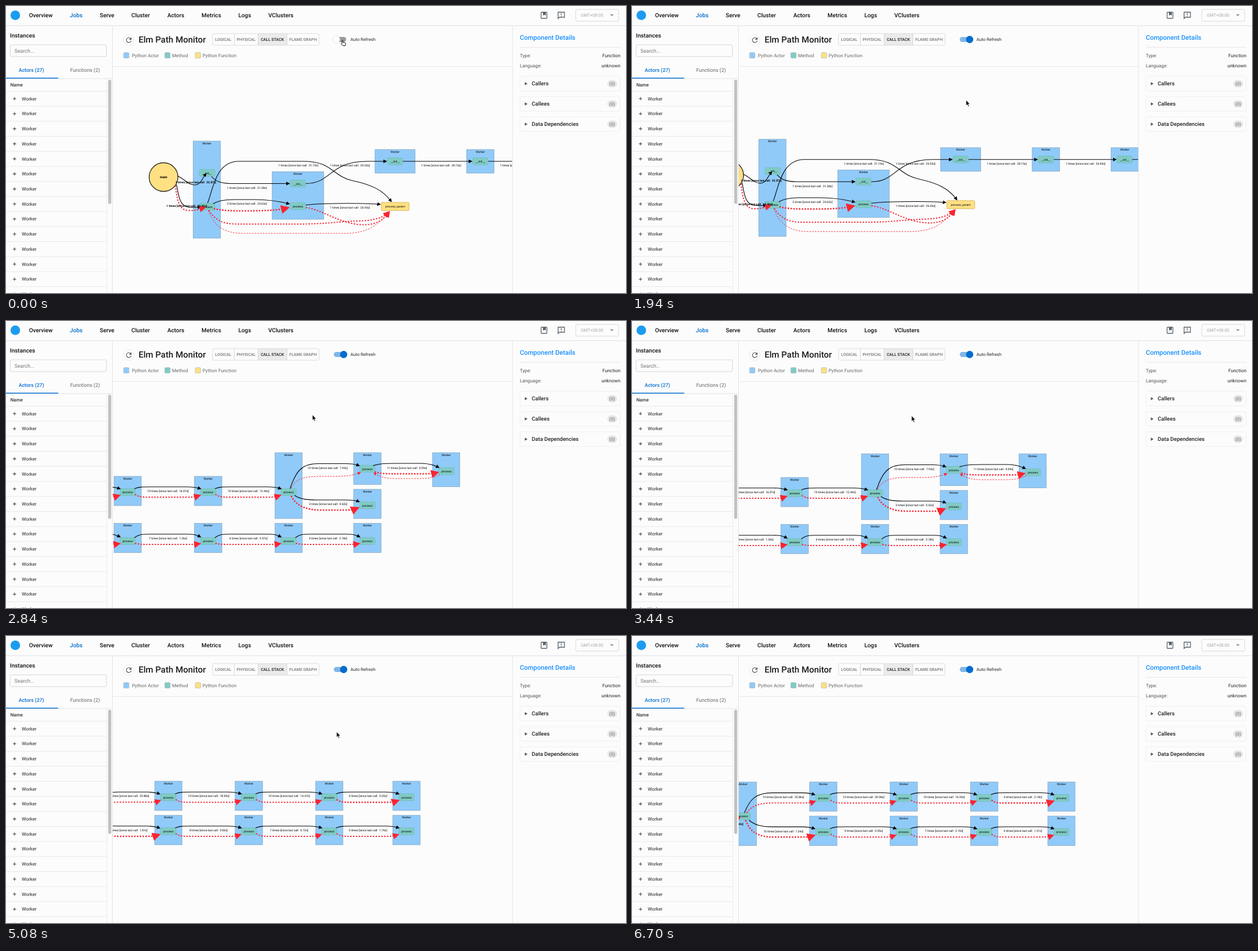
Animation of 1098 by 510 pixels, one loop 8 s. Source, as an HTML page:

```html
<!DOCTYPE html>
<html lang="en">
<head>
<meta charset="utf-8">
<title>Call stack view</title>
<style>
  html, body { margin: 0; width: 100%; height: 100%; overflow: hidden; background: #fcfcfc; }
  svg { display: block; width: 1098px; height: 510px; font-family: Roboto, sans-serif; }
  text { text-rendering: geometricPrecision; white-space: pre; }
</style>
</head>
<body>
<svg id="stage" viewBox="0 0 1098 510"></svg>
<script>
const BLUE = '#036dcf', RED = '#fb2430';
const ACTOR = '#90caf9', METHOD = '#80cbc4', FUNC = '#ffe082';
const LOOP = 8000, START = 440, TICK = 148.8;

// ---- drawing helpers ----
const text = (x, y, s, size, fill = '#222', weight = 400, anchor = 'start') =>
  `<text x="${x}" y="${y + size * 0.355}" font-size="${size}" fill="${fill}" font-weight="${weight}" text-anchor="${anchor}">${s}</text>`;
const rect = (x, y, w, h, fill, stroke = 'none', r = 0, sw = 0.7) =>
  `<rect x="${x}" y="${y}" width="${w}" height="${h}" rx="${r}" fill="${fill}" stroke="${stroke}" stroke-width="${sw}"/>`;
const path = (d, fill, stroke = 'none', sw = 1, extra = '') =>
  `<path d="${d}" fill="${fill}" stroke="${stroke}" stroke-width="${sw}" ${extra}/>`;
const circle = (x, y, r, fill, extra = '') => `<circle cx="${x}" cy="${y}" r="${r}" fill="${fill}" ${extra}/>`;
const line = (x1, y1, x2, y2, stroke = '#e2e2e2', sw = 0.8) => path(`M${x1} ${y1}L${x2} ${y2}`, 'none', stroke, sw);

// ---- graph helpers ----
const caption = (x, y, s, size = 5.12, weight = 400) => text(x, y, s, size, '#000', weight, 'middle');
const label = (x, y, n, sec, weight) => caption(x, y, `${n} times [since last call: \u00a0${sec}s]`, 5.08, weight);
const worker = (x, top, bottom, w = 48.5) =>
  rect(x - w / 2, top, w, bottom - top, ACTOR, '#7f9fb8') + caption(x, top + 3.7, 'Worker');
const node = (x, y, name = 'process') =>
  `<rect x="${x - 13.5}" y="${y - 6.3}" width="27" height="12.6" rx="2" fill="${METHOD}" stroke="#5fae9f" stroke-width=".7" stroke-dasharray="2 1.5"/>` + caption(x, y + 0.2, name);
const call = d => path(d, 'none', '#000', 1.1, 'marker-end="url(#black)"');
const flow = (d, w = 2) =>
  path(d, 'none', RED, w, `stroke-dasharray="${w < 1.3 ? '2.8 2' : '2.5 2.5'}" marker-end="url(#red)"`);

// Call and data edge between two nodes of one row; s shifts the route.
function link(x0, x1, y, n, sec, w = 2, s = 0) {
  const up = y - 9.3 + s, down = y + 9 + s;
  return call(`M${x0 + 12} ${y - 6}C${x0 + 20} ${up} ${x0 + 26} ${up} ${x0 + 40} ${up}H${x1 - 38}C${x1 - 26} ${up} ${x1 - 21} ${up + 1} ${x1 - 14} ${y - 6 + s / 2}`)
    + flow(`M${x0 + 13} ${y + 4}C${x0 + 20} ${down} ${x0 + 26} ${down} ${x0 + 40} ${down}H${x1 - 38}C${x1 - 28} ${down} ${x1 - 24} ${down} ${x1 - 16} ${y + 6.3 + s / 2}`, w)
    + label((x0 + x1) / 2, y - 2 + s, n, sec);
}

function startGraph() {
  const init = '__init__';
  return worker(355.7, 240, 412.5) + worker(517, 294.5, 379, 91.5) + worker(689, 255, 297, 71)
    + worker(840, 255, 297) + worker(979.5, 255, 297)
    + circle(279, 304, 25.5, FUNC, 'stroke="#222" stroke-width="1.3"') + caption(279, 304, 'main', 5.9, 700)
    + node(356, 296.5, init) + node(356.5, 356.5) + node(517, 315.5, init) + node(517, 355.5)
    + [689, 840, 979.5].map(x => node(x, 276, init)).join('')
    + rect(664.5, 349, 49.5, 14.5, FUNC, '#c9a545', 2) + caption(689.3, 356.4, 'process_param')
    + call('M304 302C318 309 324 319 336 318C345 317 348 305 354 298.5')
    + call('M302 317C306 340 308 356 324 357.5C332 358.3 338 358 344 357.5')
    + call('M364 303C373 313 382 315 397 315.5H501')
    + call('M357 350C366 330 370 276 412 276H527C577 276 577 301 612 310C650 318 668 328 682 347')
    + call('M367 351C376 346 386 344 402 344H440C465 344 484 347 501 351.5')
    + call('M531 315.5C577 315.5 572 276 640 276H673')
    + call('M531 353.5C555 351 580 350.7 604 350.7C630 350.7 648 351 662 352.3')
    + call('M703 276H824') + call('M854 276H963.5') + call('M993 276H1120')
    + flow('M300 319C303 344 306 362 322 363.5C334 364 342 361 351 358.5', 2)
    + flow('M359 363C371 381 384 387.5 410 387.5H517C570 387.5 585 383 625 382C652 381 666 377 677 367', 1.9)
    + flow('M531 358C562 363 585 383 622 388C650 391 666 384 678 367', 1.9)
    + flow('M358 363C368 390 385 404 420 404H600C642 404 660 388 677 366', 0.9)
    + flow('M368 360C384 364 402 364 425 364C460 364 482 363 498 359', 2.6)
    + label(336, 313.5, 1, '32.87', 700) + label(320, 355.5, 1, '32.92', 700)
    + label(426.5, 323, 1, '31.38') + label(426.5, 351, 2, '24.63') + label(517.5, 283, 1, '31.19')
    + label(609, 283.5, 1, '29.53') + label(609, 358.5, 1, '26.43')
    + label(770.5, 283.5, 1, '28.15') + label(910, 283.5, 1, '26.90');
}

function branchGraph() {
  const row = [215.5, 358, 500.5, 640];
  return row.map(x => worker(x, 359.5, 411.5)).join('')
    + worker(row[0], 276, 328) + worker(row[1], 276, 328) + worker(row[2], 234, 351)
    + worker(row[3], 234, 290.5) + worker(row[3], 299, 351) + worker(779.5, 234, 294.5)
    + row.map(x => node(x, 391)).join('') + row.slice(0, 3).map(x => node(x, 304)).join('')
    + node(640, 262.5) + node(640, 327.5) + node(780, 267)
    + link(73, row[0], 304, 10, '19.70', 2.2) + link(row[0], row[1], 304, 10, '16.07', 2.1)
    + link(row[1], row[2], 304, 10, '12.44', 2.1)
    + link(73, row[0], 391, 8, '0.05', 2.2, -3) + link(row[0], row[1], 391, 7, '1.26', 2.1, -3)
    + link(row[1], row[2], 391, 6, '0.57', 2.1, -3) + link(row[2], row[3], 391, 4, '2.18', 2.1, -3)
    + call('M503 298C513 268 523 253.5 552 253.5H602C613 253.5 619 254.5 625 257')
    + flow('M505 297C514 280 528 276 560 276H588C606 276 618 273 627 269.5', 1)
    + call('M650 257C664 253 672 253 690 253H735C750 253 758 256 766 260')
    + flow('M653 268C663 271.5 672 271.5 700 271.5H738C752 271.5 757 271 763 269.5', 2.4)
    + flow('M768 273C756 279 745 280 730 280H690C672 280 662 277 652 270.5', 0.9)
    + call('M511 310C522 317 534 318 550 318H600C612 318 619 318.5 625 321')
    + flow('M505 311C514 328 530 336 558 336H598C609 336 615 335.5 622 332.5', 2.6)
    + label(569.5, 261, 10, '7.93') + label(710, 261, 11, '0.09') + label(570.5, 325, 3, '0.62');
}

// Two parallel rows; each entry is [count, seconds].
function rowsGraph(top, bottom, entry = '') {
  const xs = [183.3, 325.8, 468.3, 610.8, 747.5];
  const row = (list, y, wide) => list.slice(1).map(([n, sec], i) =>
    link(xs[i + 1], xs[i + 2], y, n, sec, i === wide ? 2.4 : 1.9)).join('');
  return worker(xs[0], 260, 373)
    + xs.slice(1).map(x => worker(x, 260, 312) + worker(x, 320.7, 373) + node(x, 288.5) + node(x, 349)).join('')
    + node(xs[0], 321) + row(top, 288.5, 2) + row(bottom, 349)
    + call('M186 315C196 290 206 279.3 237 279.3H288C299 279.3 304 280.5 310 282.5')
    + flow('M190 315C200 302 210 297.3 240 297.3H288C299 297.3 304 297 310 294.8', 1.9)
    + call('M194 328C205 337 216 339.8 236 339.8H288C299 339.8 304 341 310 343')
    + flow('M188 328C197 350 210 358 240 358H286C297 358 302 357.5 308 355.5', 2.5)
    + label(255, 286.5, ...top[0]) + label(255, 347.5, ...bottom[0]) + entry;
}

const entry = call('M148 330C160 332 168 328 177 323') + flow('M150 334C162 335 170 328 178 323', 1.2)
  + label(146.5, 335, 10, '29.00', 700);
const graphs = [
  startGraph(),
  branchGraph(),
  rowsGraph([[10, '23.88'], [10, '18.09'], [10, '14.47'], [4, '0.20']],
    [[9, '1.81'], [8, '0.83'], [7, '0.12'], [5, '1.76']]),
  rowsGraph([[10, '25.86'], [10, '20.08'], [10, '16.45'], [4, '2.18']],
    [[10, '1.34'], [9, '0.35'], [7, '2.10'], [6, '1.31']], entry)
];

// ---- page parts ----
function header() {
  const nav = [['Overview', 40.7], ['Jobs', 113], ['Serve', 166], ['Cluster', 222], ['Actors', 285.7],
    ['Metrics', 346.3], ['Logs', 411.5], ['VClusters', 464.5]];
  const ink = '#58616b';
  return line(0, 35, 1098, 35, '#e4e9f2', 1.3) + circle(16.5, 16.5, 8.5, '#1c9cf0')
    + nav.map(([s, x]) => text(x, 16.7, s, 10.24, s === 'Jobs' ? BLUE : '#111', 500)).join('')
    + rect(947.6, 11, 10.3, 11, 'none', ink, 1, 1.3) + path('M951 11H956V17L953.5 15.6L951 17Z', ink)
    + path('M977.7 11H989V20H980L977.7 22.3Z', 'none', ink, 1.3) + path('M983.3 12.7V16M983.3 17.3V18.6', 'none', ink, 1.3)
    + rect(1009, 6, 76, 21, 'none', '#c9c9c9', 2.5) + text(1018, 16.5, 'GMT+08:00', 7.68, '#a6a6a6')
    + path('M1069.8 14.7H1076.2L1073 18Z', '#8a8a8a');
}

function sidebar() {
  let out = text(7, 52, 'Instances', 10.24, '#111', 500) + rect(7.4, 69, 170.6, 21, 'none', '#c4c4c4', 2.6)
    + text(15, 79.5, 'Search...', 9.1, '#777')
    + text(45, 113.7, 'Actors (27)', 8.96, BLUE, 500, 'middle') + text(140, 113.7, 'Functions (2)', 8.96, '#666', 400, 'middle')
    + line(0, 129, 188, 129, '#dcdcdc') + rect(0, 127.5, 92.5, 1.5, BLUE) + text(7.7, 140, 'Name', 8.32, '#333', 500);
  for (let i = 0; i < 14; i++) {
    const y = 164.7 + i * 26.73;
    out += line(0, y - 13.4, 178.5, y - 13.4) + path(`M12.2 ${y}H18M15.1 ${y - 2.9}V${y + 2.9}`, 'none', '#444', 1.1)
      + text(28, y, 'Worker', 8.32);
  }
  return out + line(178.7, 129, 178.7, 510, '#e6e6e6') + rect(181, 131, 5.4, 220.5, '#c1c1c1', 'none', 2.6)
    + line(188.5, 35, 188.5, 510, '#dedede');
}

function toolbar() {
  const tabs = [['LOGICAL', 384.7], ['PHYSICAL', 425.2], ['CALL STACK', 471.7], ['FLAME GRAPH', 526]];
  const legend = [['Python Actor', 208, ACTOR], ['Method', 281, METHOD], ['Python Function', 335, FUNC]];
  return circle(217.5, 60.5, 9.3, '#fff', 'stroke="#e2e2e2" stroke-width=".8"')
    + path('M221 58A4.3 4.3 0 1 0 221.7 61.7', 'none', '#555', 1.2) + path('M222.2 55.6V60H217.8Z', '#555')
    + text(234.7, 59.5, 'Elm Path Monitor', 15.4, '#1c1c1c', 500)
    + rect(446.5, 49, 51, 20.7, '#ebebeb') + rect(365.7, 49, 188.6, 20.7, 'none', '#cfcfcf', 2.6)
    + [404.5, 446.5, 497.5].map(x => line(x, 49, x, 69.7, '#cfcfcf')).join('')
    + tabs.map(([s, x], i) => text(x, 59.5, s, 7.17, i === 2 ? '#1c1c1c' : '#757575', 500, 'middle')).join('')
    + `<g id="off">${rect(581, 55, 21.5, 9, '#9b9b9b', 'none', 4.5)}${circle(585, 59.5, 6.3, '#fff', 'stroke="#ddd" stroke-width=".8"')}</g>`
    + `<g id="on">${rect(580.5, 55, 21.5, 9, '#82b6e7', 'none', 4.5)}${circle(598, 59.5, 6.4, BLUE)}</g>`
    + text(610, 59.5, 'Auto Refresh', 7.68)
    + legend.map(([s, x, c]) => rect(x + 0.2, 82.8, 9.6, 9.8, c, '#a9b7bd', 1.6) + text(x + (x === 208 ? 15 : 13), 88, s, 8.32, '#666')).join('')
    + line(188.5, 107.5, 897, 107.5, '#e4e4e4');
}

function details() {
  const facts = [['Type:', 'Function', 88.3], ['Language:', 'unknown', 105.8]];
  return line(897, 35, 897, 510, '#dedede') + text(910, 56, 'Component Details', 11.5, '#1890ff', 500)
    + line(910, 73.5, 1088, 73.5)
    + facts.map(([k, v, y]) => text(910, y, k, 8.32, '#555') + text(1088, y, v, 8.32, '#222', 400, 'end')).join('')
    + ['Callers', 'Callees', 'Data Dependencies'].map((s, i) => {
      const y = 138 + i * 36;
      return rect(910.4, y - 13, 177, 26, '#fcfcfc', '#eaeaea', 2.5) + path(`M918.8 ${y - 2.7}V${y + 2.7}L923.6 ${y}Z`, '#555')
        + text(931, y, s, 9.6, '#222', 500) + rect(1065, y - 6.5, 17, 13, '#e6e6e6', 'none', 6.5)
        + text(1073.5, y, '(0)', 8, '#666', 400, 'middle');
    }).join('');
}

const head = (id, fill) =>
  `<marker id="${id}" viewBox="0 0 10 10" refX="7" refY="5" markerWidth="6" markerHeight="6" orient="auto">${path('M0 0L10 5L0 10Z', fill)}</marker>`;
const cursors =
  `<g id="arrow">${path('M0 0V10.2L2.3 8.1L4 11.8L5.7 11L4.1 7.4H7.2Z', '#111', '#fff', 0.8)}</g>`
  + `<g id="hand">${path('M1 .8C1.8 .2 2.7 .7 2.7 1.7V4.6L6.3 5.3C7.4 5.6 7.8 6.3 7.6 7.3L7 10.5H2.6L-.3 7.4C-.7 6.7.2 6 1 6.6Z', '#fff', '#111', 1)}</g>`;

const $ = id => document.getElementById(id);
$('stage').innerHTML = `<defs>${head('black', '#000')}${head('red', RED)}
  <clipPath id="view">${rect(189, 108, 707.6, 402, '#000')}</clipPath></defs>
  ${rect(0, 0, 1098, 510, '#fcfcfc')}
  <g clip-path="url(#view)"><g id="pan">${graphs.map(g => `<g class="graph">${g}</g>`).join('')}</g></g>
  ${header()}${sidebar()}${toolbar()}${details()}${cursors}`;

// ---- motion: tick, cursor x, y, graph x, y ----
const keys = [
  [-1, 594, 60, 0, 0], [0, 594, 60, 0, 0], [2, 678, 172.5, 0, 0],
  [4, 642, 170, -36, -2.5], [7, 575, 169, -103, -3.2], [8, 571, 168, -107, -3.2],
  [10, 591.5, 167, -107, -3.2], [12, 640, 167, -107, -3.2], [13, 632, 167, -115, -3.2],
  [14, 620, 167, 78, 0], [16, 542.5, 166.5, 0, 0], [19, 472, 168.5, -70, 2],
  [22, 541, 168, -70, 2], [25, 541.5, 168, -70, 2], [27, 541.5, 168, -70, 2],
  [28, 547, 168, -76.5, -4], [34, 623.5, 172, 0, 0], [35, 636.5, 171.3, 13, -0.7],
  [36, 660, 150, 13, -0.7], [41, 1092, 466, 13, -0.7], [42, 1115, 482, 13, -0.7]
];
const swaps = [14, 28, 41];
const layers = document.querySelectorAll('.graph');
const show = (el, yes) => el.setAttribute('visibility', yes ? 'visible' : 'hidden');
const move = (el, x, y) => el.setAttribute('transform', `translate(${x} ${y})`);

function pose(n) {
  const i = keys.findIndex(k => k[0] >= n);
  if (i < 1) return keys[i < 0 ? keys.length - 1 : 0];
  const a = keys[i - 1], b = keys[i], p = (n - a[0]) / (b[0] - a[0]);
  return a.map((v, j) => v + (b[j] - v) * p);
}

function draw() {
  const t = performance.now() % LOOP;
  const n = Math.max(-1, Math.floor((t - START) / TICK));
  const [, cx, cy, gx, gy] = pose(n);
  const scene = swaps.filter(s => n >= s).length;
  layers.forEach((g, i) => show(g, i === scene));
  move($('pan'), gx, gy);
  show($('off'), n < 0);
  show($('on'), n >= 0);
  show($('hand'), n < 1);
  show($('arrow'), n >= 1);
  move($('hand'), cx, cy);
  move($('arrow'), cx, cy);
  requestAnimationFrame(draw);
}
draw();
</script>
</body>
</html>
```
